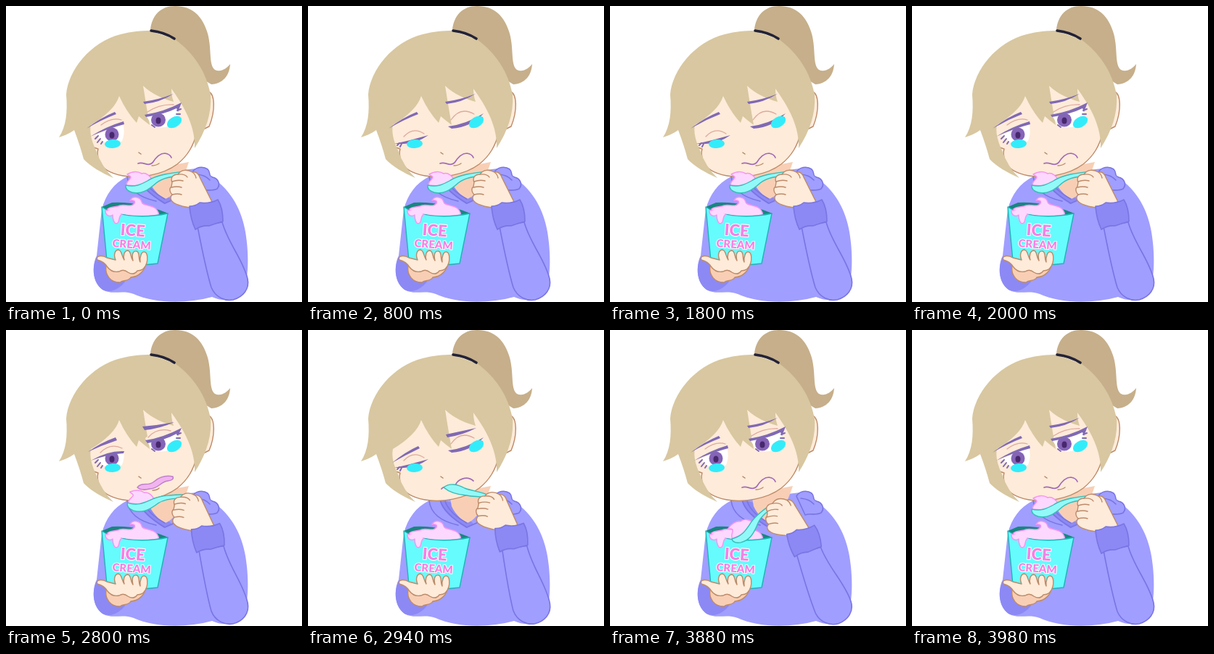
An HTML page that plays this animation: 408x408 px, repeating every 4780 ms.

```html
<!DOCTYPE html>
<html lang="en">
<head>
<meta charset="utf-8">
<title>Sad ice cream</title>
<style>
html, body { margin: 0; width: 100%; height: 100%; overflow: hidden; background: #fff; }
svg { display: block; width: 100%; height: 100%; }
path, ellipse { stroke-linecap: round; stroke-linejoin: round; }
.skin { fill: #feebd9; stroke: #bd8a69; stroke-width: 1.4; }
.shade { fill: #f8cfb4; }
.hair { fill: #d8c7a0; }
.cloth { fill: #a09eff; }
.seam { stroke: #7975e3; stroke-width: 1.6; }
.dark { fill: #8c89f5; }
.brow { fill: #8069b4; }
.lash { stroke: #8069b4; stroke-width: 2; }
.crease { stroke: #dfa99f; stroke-width: 1.3; }
.iris { fill: #8564b7; }
.pupil { fill: #47286c; }
.tear { fill: #33ecfa; }
.lip { stroke: #a16bb7; stroke-width: 1.7; }
.spoon { fill: #92f9f8; stroke: #35bcb8; stroke-width: 1.4; }
.cream { fill: #fdd8fe; stroke: #f794f2; stroke-width: 1.5; }
.line { fill: none; }
text { font-family: Lato, "Open Sans", sans-serif; font-weight: 900; text-anchor: middle;
  fill: #f582e4; stroke: #fff; stroke-width: 2; stroke-linejoin: round; paint-order: stroke; }
</style>
</head>
<body>
<svg viewBox="0 0 408 408">
  <!-- ponytail -->
  <path fill="#c6af8a" d="M199 33C201 13 213 0 233 0C257 0 271 14 278 38C284 60 279 81 288 88C296 92 304 86 309 80C308 96 299 107 283 108L250 88L233 46Z"/>

  <!-- hoodie -->
  <path class="cloth" d="M167 235C148 245 138 259 132 280L125 344C118 358 119 381 133 391C146 399 160 391 176 397C205 410 247 411 284 401C297 407 315 408 326 396C335 376 334 346 332 326C329 292 317 264 294 244L262 224Z"/>
  <path class="dark" d="M181 233C184 251 204 263 218 273L228 267L198 238Z"/>
  <path class="shade" d="M195 226L198 243C203 254 211 261 219 266C231 262 241 248 252 215Z"/>
  <path class="line seam" d="M167 235C169 253 184 264 207 269M182 234C186 250 202 262 219 272L239 263M189 236C194 250 206 259 219 266"/>
  <path class="cloth seam" d="M257 229C261 222 271 220 278 225C283 230 278 234 285 236C293 238 296 246 291 252C284 256 275 252 269 255Z"/>
  <path class="line seam" d="M263 232Q275 233 281 240"/>

  <!-- head -->
  <path class="skin" d="M279 118C288 121 289 144 280 166L268 172Z"/>
  <path class="skin" d="M108 165L112 196L127 212C132 225 144 231 161 234C184 238 216 233 236 218C251 206 258 193 263 175L266 120L190 95L140 110Z"/>
  <path class="skin line" d="M121 195L127 197Q125 204 128 212"/>
  <path class="hair" d="M73 181C83 166 85 146 83 122C86 88 116 50 158 39C173 35 187 34 199 34L233 46C260 66 276 91 282 122C284 148 275 173 260 196C261 174 253 148 228 114Q228 124 231 132C217 128 202 122 189 110Q193 136 198 164Q190 158 183 152L180 161Q166 146 156 124C152 138 137 152 117 164Q114 178 124 199Q132 222 148 237C132 230 116 221 107 211Q102 192 94 171Q86 177 73 181Z"/>
  <path class="line" stroke="#232238" stroke-width="3.6" d="M200 34Q218 36 232 45"/>

  <g data-part="eyes" data-on="open half">
    <path fill="#fff" d="M123 178L161 161Q165 174 160 186Q147 193 134 187Z"/>
    <path fill="#fff" d="M193 151L239 137Q237 153 229 164Q212 171 201 164Z"/>
    <ellipse class="iris" cx="146" cy="177" rx="9.5" ry="9.5"/>
    <ellipse class="pupil" cx="146" cy="178" rx="3.5" ry="4.5"/>
    <ellipse class="iris" cx="210" cy="157" rx="10" ry="9.5"/>
    <ellipse class="pupil" cx="210" cy="158" rx="3.5" ry="4.5"/>
    <path class="line lash" d="M127 179L123 183M130 183L126 188M133 187L131 190M236 144L241 142M235 149L240 149M201 164L205 167"/>
  </g>
  <g data-part="eyes" data-on="open">
    <path class="brow" d="M116 180Q138 166 162 159L163 163Q140 169 116 180ZM191 150Q217 146 242 133L237 146L235 141Q219 149 193 153Z"/>
    <path class="line crease" d="M131 164Q146 153 159 157M195 146Q212 135 231 136"/>
  </g>
  <g data-part="eyes" data-on="half">
    <path fill="#feebd9" d="M121 180Q138 157 163 160L162 168Q142 169 123 179ZM192 149Q211 133 238 136L237 141Q218 152 194 155Z"/>
    <path class="brow" d="M117 180Q140 166 163 167L162 170Q141 171 117 180ZM192 152Q215 149 242 135L237 146L235 143Q219 152 195 156Z"/>
    <path class="line crease" d="M130 169Q144 155 160 163M196 148Q208 134 227 139"/>
  </g>
  <g data-part="eyes" data-on="shut">
    <path class="brow" d="M119 190Q142 185 166 178Q149 190 132 190ZM193 166Q218 163 242 148Q225 167 198 169Z"/>
    <path class="line crease" d="M132 180Q145 166 160 176M197 157Q210 138 229 149"/>
    <path class="line lash" d="M126 189L123 192M129 190L127 194M236 153L240 154"/>
  </g>
  <ellipse class="tear" cx="147" cy="190" rx="11" ry="6" transform="rotate(-3 147 190)"/>
  <ellipse class="tear" cx="232" cy="160" rx="11" ry="7" transform="rotate(-31 232 160)"/>

  <path class="brow" data-part="brows" data-on="rest" d="M111 169Q130 154 150 146L152 149Q131 157 111 169ZM189 132Q211 129 231 121Q212 133 191 135Z"/>
  <path class="brow" data-part="brows" data-on="up" d="M113 168Q131 155 151 148L153 152Q132 159 113 168ZM188 133Q211 131 232 127Q212 136 191 138Z"/>
  <path class="brow" data-part="brows" data-on="low" d="M116 183Q134 168 152 160L154 163Q135 172 116 183ZM190 144L232 135Q213 145 192 148Z"/>

  <path class="line" stroke="#b18460" stroke-width="1.5" d="M183 202L186 204"/>
  <g data-part="mouth" data-on="frown">
    <path class="line lip" d="M182 217C190 214 195 222 202 216C207 208 213 203 219 203Q226 204 228 209"/>
    <path class="skin line" d="M201 220Q207 220 211 217"/>
  </g>
  <g data-part="mouth" data-on="open">
    <path fill="#f2b4ef" stroke="#c07fca" stroke-width="1.5" d="M181 217C187 209 196 216 204 209C211 203 220 200 230 202Q232 207 223 208C213 209 210 219 198 219Q187 222 181 217Z"/>
    <path class="skin line" d="M202 221Q208 221 211 218"/>
  </g>
  <path class="line lip" data-part="mouth" data-on="shut" d="M184 219Q187 215 195 216M203 215C205 206 219 200 228 208"/>

  <!-- cup -->
  <path class="dark" d="M125 346C118 360 119 381 133 391C146 397 158 388 164 380L142 358Z"/>
  <path fill="#16877f" d="M132 277L146 271Q183 269 224 286L211 296L150 292Z"/>
  <path class="cream" d="M137 283C142 275 151 278 157 275C164 273 173 278 177 272C179 269 175 267 171 268C175 261 185 263 187 270C187 275 200 274 206 279Q212 284 210 292L150 294Z"/>
  <path fill="#66fbfd" stroke="#1fb4b6" stroke-width="1.400" d="M132 277C148 288 184 294 223 286L209 355Q174 360 139 351Z"/>
  <path class="cream" d="M137 282C137 289 143 291 147 288C147 296 150 302 154 299C157 296 155 289 160 287L151 280Z"/>
  <path fill="#fdd8fe" d="M140 281Q154 276 163 278Q186 274 206 287Q182 291 158 286Z"/>
  <g transform="rotate(4 174 318)">
    <text x="174" y="317" font-size="22">ICE</text>
    <text x="174" y="334" font-size="15">CREAM</text>
  </g>
  <path class="skin shade" style="fill:#f8cfb4" d="M138 358C136 371 144 381 157 381C162 377 169 380 172 374C183 373 191 366 193 354Z"/>
  <path class="skin" d="M126 350C123 344 132 343 139 347L151 350C148 343 150 336 155 336C160 337 159 344 163 350C161 344 163 337 168 337C173 338 171 346 175 351C173 342 175 337 180 338C185 339 182 348 185 353C184 345 187 338 191 339C196 340 195 351 194 354Q191 365 181 365Q176 372 168 367Q162 362 156 366Q146 368 140 360Q135 352 126 350Z"/>

  <!-- raised arm -->
  <g id="arm">
    <path class="cloth seam" d="M264 304C270 335 276 365 283 388C289 402 302 407 313 405C327 401 336 390 333 376C327 350 306 327 298 298Z"/>
    <g id="spoon">
      <path class="cream" data-part="scoop" data-on="yes" d="M166 247C166 241 172 239 172 236C171 233 168 234 167 232C176 227 182 228 187 231C193 229 200 235 201 240L190 249Z"/>
      <path class="spoon" d="M165 247C178 250 186 246 195 241C209 232 229 230 247 228L247 234C232 234 217 236 207 244C196 254 186 260 174 257Q164 254 165 247Z"/>
      <path fill="#35bcb8" data-part="scoop" data-on="no" d="M165 247C172 240 186 239 197 240C187 247 177 250 165 247Z"/>
    </g>
    <path class="spoon" id="bite" d="M187 217C195 210 207 213 216 218C226 222 236 222 247 227L246 231C235 229 228 230 219 228C206 227 195 224 187 217Z"/>
    <path class="skin" d="M229 243C226 236 231 232 237 232C242 225 250 225 257 229C262 228 266 232 268 238L284 270L258 279C250 277 237 276 231 271C226 268 226 263 229 260C225 256 225 251 228 249Z"/>
    <path class="skin line" d="M229 242Q237 239 244 241M228 250Q236 248 242 250M229 260Q237 258 242 260M237 232Q247 231 250 236M257 229Q261 232 262 237"/>
    <path class="dark seam" d="M253 276Q261 276 267 271Q280 273 292 267Q299 278 299 297Q288 300 280 303Q270 302 261 308Q254 293 253 276Z"/>
  </g>
</svg>
<script>
const LOOP = 4780;
const rest = { eyes: "open", brows: "rest", mouth: "frown", scoop: "yes", arm: 0, spoon: 0 };
const blink = { ...rest, eyes: "shut" };
const lift = { ...rest, eyes: "half", brows: "up", mouth: "open", arm: 1.3, spoon: 4 };
const steps = [
  [0, rest], [800, blink], [1000, rest], [1800, blink], [2000, rest],
  [2800, lift],
  [2870, { ...lift, arm: 2, spoon: 14 }],
  [2940, { eyes: "shut", brows: "low", mouth: "shut", scoop: "none", arm: 2.5, bite: true }],
  [3740, { ...lift, scoop: "no", spoon: 7 }],
  [3810, { ...rest, scoop: "no", arm: -3, spoon: -9 }],
  [3880, { ...rest, arm: -5, spoon: -22 }],
  [3980, rest]
];

const $ = id => document.getElementById(id);
const parts = [...document.querySelectorAll("[data-part]")];
const show = (el, on) => { el.style.display = on ? "" : "none"; };
const turn = (el, deg, pivot) => el.setAttribute("transform", `rotate(${deg} ${pivot})`);
const elbow = "312 385", grip = "245 231";
let current;

function pose(p) {
  for (const el of parts) show(el, el.dataset.on.split(" ").includes(p[el.dataset.part]));
  show($("spoon"), !p.bite);
  show($("bite"), p.bite);
  turn($("arm"), p.arm, elbow);
  turn($("spoon"), p.spoon || 0, grip);
  // the bitten spoon stays between the lips while the arm is turned
  turn($("bite"), -p.arm, elbow);
}

const start = performance.now();
function tick() {
  const t = (performance.now() - start) % LOOP;
  const next = steps.findLast(([at]) => at <= t)[1];
  if (next !== current) pose(current = next);
  requestAnimationFrame(tick);
}
tick();
</script>
</body>
</html>
```
